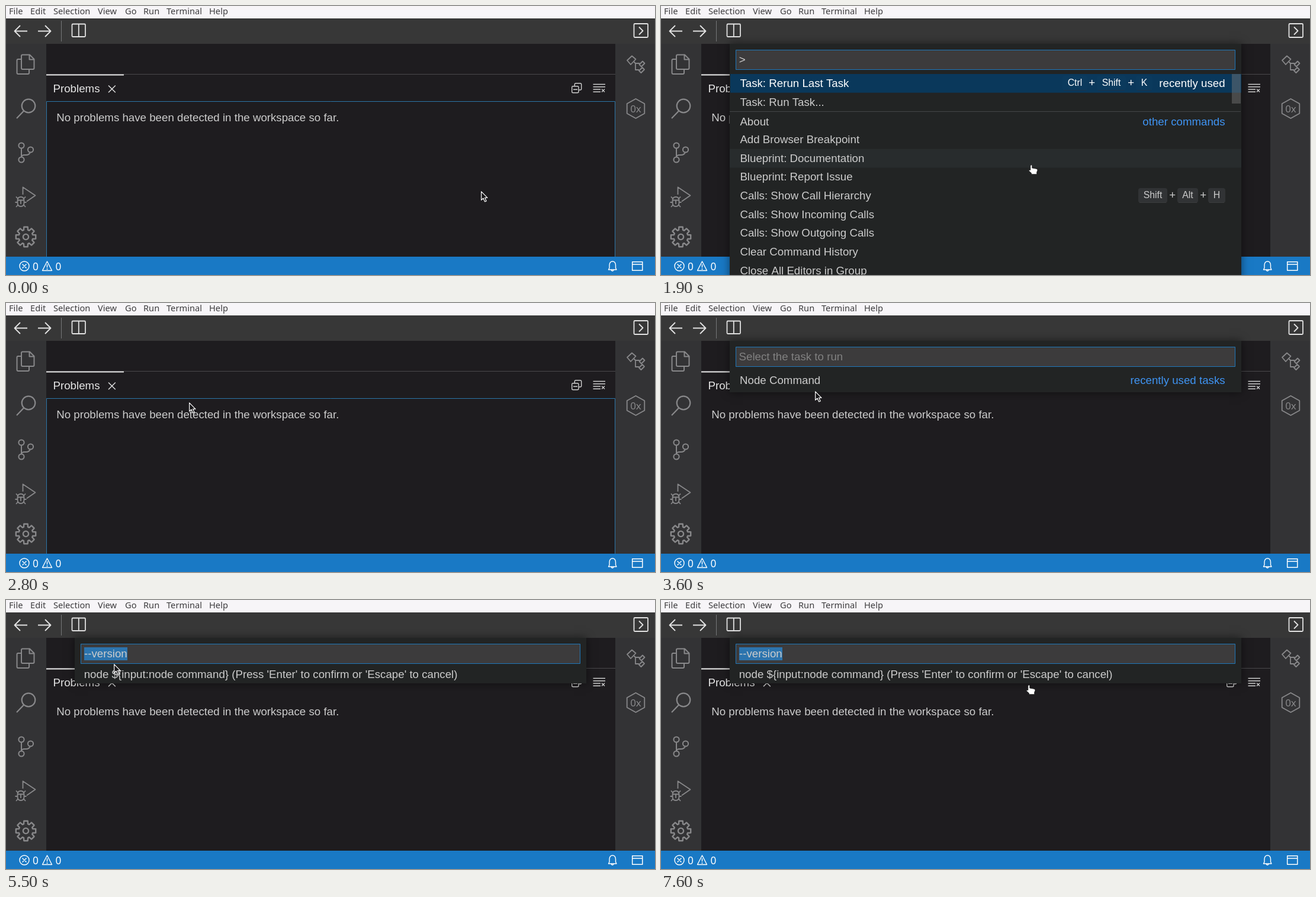
These frames come from a looping animation (1096x455 px, 8 s). An HTML page with a canvas:

```html
<!DOCTYPE html>
<html lang="en">
<head>
<meta charset="utf-8">
<title>Running a task</title>
<style>
  html, body { margin: 0; width: 100%; height: 100%; overflow: hidden; background: #1e1c1f; }
  canvas { display: block; }
</style>
</head>
<body>
<canvas id="stage" width="1096" height="455"></canvas>
<script>
const ctx = document.getElementById('stage').getContext('2d');
const LOOP = 8000, STEP = 100;
const UI = '18.72px "Liberation Sans", Arial, sans-serif';
const KEY = '15.84px "Liberation Sans", Arial, sans-serif';
const MENU = '14.67px "Noto Sans", sans-serif';
const STATUS = '500 17.28px "Noto Sans", sans-serif';
const HEX = '17px "Noto Sans", sans-serif';
const TEXT = '#cccccc', LINK = '#3f94f3', BLUE = '#1f78ba', PANEL = '#222424', HOVER = '#282c2d';
const ROW_TOP = 115, ROW_HEIGHT = 31.68;

const commands = [
  'Task: Rerun Last Task', 'Task: Run Task...', 'About', 'Add Browser Breakpoint',
  'Blueprint: Documentation', 'Blueprint: Report Issue', 'Calls: Show Call Hierarchy',
  'Calls: Show Incoming Calls', 'Calls: Show Outgoing Calls', 'Clear Command History',
  'Close All Editors in Group'
];

// Pointer hot spot: time, x, y
const pointerPath = [
  [0, 802, 313], [1800, 802, 313], [1900, 625, 269], [2400, 309, 168], [3400, 309, 168],
  [4000, 220, 133], [4700, 220, 133], [4800, 218, 124], [5400, 218, 124], [5500, 182, 108],
  [5700, 182, 108], [5800, 150, 92], [6100, 338, 95], [6500, 338, 95], [6900, 595, 119],
  [7300, 595, 119], [7600, 621, 144], [LOOP, 621, 144]
];

function rect(x, y, w, h, color) {
  ctx.fillStyle = color;
  ctx.fillRect(x, y, w, h);
}

function text(str, x, y, color = TEXT, font = UI, align = 'left') {
  ctx.font = font;
  ctx.textAlign = align;
  ctx.fillStyle = color;
  ctx.fillText(str, x, y);
}

function line(d, color, width, fill) {
  const path = new Path2D(d);
  if (fill) { ctx.fillStyle = fill; ctx.fill(path); }
  ctx.strokeStyle = color;
  ctx.lineWidth = width;
  ctx.stroke(path);
}

const circle = (x, y, r) => `M${x - r} ${y}a${r} ${r} 0 1 0 ${2 * r} 0a${r} ${r} 0 1 0 ${-2 * r} 0`;

function gear(cx, cy, r, color, width) {
  const points = [];
  for (let k = 0; k < 8; k++) {
    for (const [offset, scale] of [[-.3, .71], [-.19, 1], [.19, 1], [.3, .71]]) {
      const a = k * Math.PI / 4 + offset;
      points.push(`${cx + r * scale * Math.cos(a)} ${cy + r * scale * Math.sin(a)}`);
    }
  }
  line(`M${points.join('L')}Z${circle(cx, cy, r * .27)}`, color, width);
}

function drawFrame() {
  rect(0, 0, 1096, 455, '#1e1c1f');
  rect(0, 0, 1096, 21, '#f7f5f8');
  rect(0, 21, 1096, 43, '#373737');
  rect(0, 64, 68, 360, '#333335');
  rect(1029, 64, 67, 360, '#333335');
  rect(0, 424, 1096, 31, '#1979c5');

  const menu = { File: 5, Edit: 41, Selection: 80, View: 155, Go: 201, Run: 232, Terminal: 271, Help: 343 };
  for (const label in menu) text(label, menu[label], 14, '#3c3b3d', MENU);

  line('M36 42.5H14.5M24 33L14.5 42.5L24 52M54 42.5H75.5M66 33L75.5 42.5L66 52', '#e2e2e2', 1.8);
  line('M93.5 25V60', '#757779', 1);
  line('M113 30.5H132.5Q134 30.5 134 32V50.5Q134 52 132.5 52H113Q111.5 52 111.5 50.5V32Q111.5 30.5 113 30.5ZM122.8 31V52', '#e2e2e2', 1.8);
  line('M1062 30H1082.5Q1084 30 1084 31.5V51.5Q1084 53 1082.5 53H1062Q1060.5 53 1060.5 51.5V31.5Q1060.5 30 1062 30ZM1069 35.5L1075.5 42L1069 48.5', '#e2e2e2', 1.8);

  const icon = '#88888a';
  line('M28 82.5H40L47.5 90V105Q47.5 107 45.5 107H28Q26 107 26 105V84.5Q26 82.5 28 82.5ZM39.5 83V90.5H47M26 90H20.5Q18.5 90 18.5 92V113Q18.5 115 20.5 115H37Q39 115 39 113V107', icon, 2);
  line(circle(38, 169, 11.3) + 'M30 177.5L18 190', icon, 2.2);
  line(circle(26, 236, 4.6) + circle(26, 260, 4.6) + circle(41.5, 243, 4.6) + 'M26 240.5V255.5M41 247.5Q39 252 34 252H31Q27 252 26 255', icon, 2);
  line('M28.5 319V306.5L49.5 320.5L35 330.5M19.5 329Q19.5 323 25 323T30.5 329V333Q30.5 339 25 339T19.5 333ZM19.5 328.5H30.5M25 329V335M20 326L17 322.5M30 326L33 322.5M19.5 332H15.5M30.5 332H34.5M20.5 336L17 340M29.5 336L33 340', icon, 1.8);
  gear(33.5, 390.5, 17, icon, 2.4);
  line('M1049 92L1057 84.5L1063.5 90L1055 99ZM1060.5 94.5L1063 97H1070M1063 97V108H1069M1069.5 99L1075 93.5L1078.5 97L1073 102.5ZM1069 109.5L1074.5 104L1078 107.5L1072.5 113Z', icon, 1.8);
  line('M1063.5 157L1078.3 165.3V181.7L1063.5 190L1048.7 181.7V165.3Z', icon, 1.8);
  text('0x', 1063.5, 180, icon, HEX, 'center');

  line(circle(31, 440, 8) + 'M27.5 436.5L34.5 443.5M34.5 436.5L27.5 443.5M69.5 432L77.5 447.5H61.5ZM69.5 437V442.5M69.5 444V446', '#fff', 1.4);
  text('0', 45, 446.5, '#fff', STATUS);
  text('0', 83.5, 446.5, '#fff', STATUS);
  line('M1017.5 446H1031L1029.5 443V438Q1029 432 1024.3 432T1019 438V443ZM1022 446.5Q1024.3 450 1026.5 446.5', '#fff', 1.4);
  line('M1057.7 432.7H1074.8V447.3H1057.7ZM1057.7 437H1074.8', '#fff', 1.5);
}

function drawProblems(focused) {
  rect(68, 115, 961, 1, '#4a494c');
  rect(68, 115.5, 131, 2, '#e4e4e4');
  text('Problems', 79.5, 146, '#e6e6e6');
  line('M173 134.5L184.8 146.3M184.8 134.5L173 146.3', '#dedede', 1.5);
  line('M957 135.8H965Q967 135.8 967 137.8V144.7Q967 146.7 965 146.7H957.5Q955.7 146.7 955.7 144.7V137.8Q955.7 135.8 957 135.8ZM958 141.3H965M960.3 135V132.5Q960.3 130.7 962.3 130.7H969.7Q971.7 130.7 971.7 132.7V140Q971.7 142 969.7 142H967.5', '#cfcfcf', 1.4);
  line('M991.5 132.5H1012M991.5 136.7H1012M991.5 141H1004M991.5 145.3H1004M1006 140.5L1011 145.5M1011 140.5L1006 145.5', '#cfcfcf', 1.4);
  text('No problems have been detected in the workspace so far.', 85.2, 195);
  if (focused) line('M68.5 424V161.5H1028.5V424', '#2c76a8', 1);
}

function drawPanel(bottom, focused) {
  ctx.save();
  ctx.shadowColor = 'rgba(0,0,0,.5)';
  ctx.shadowBlur = 14;
  rect(116, 64, 864, bottom - 64, PANEL);
  ctx.restore();
  rect(126, 74, 844, 34, '#3c3b3c');
  if (focused) line('M126.5 74.5H969.5V107.5H126.5Z', BLUE, 1);
}

function drawCaret(x) {
  rect(x, 80, 1.3, 21, '#d8d8d8');
}

function drawKeys(keys, y, selected) {
  keys.forEach(([label, x, w], i) => {
    ctx.beginPath();
    ctx.roundRect(x, y - 19, w, 25, 4);
    ctx.fillStyle = selected ? '#0b3a5d' : '#313335';
    ctx.fill();
    rect(x + 2, y + 5, w - 4, 1, selected ? '#1d3348' : '#3c3d3e');
    text(label, x + w / 2, y - 2, selected ? '#fff' : TEXT, KEY, 'center');
    if (i) text('+', x - 8.3, y - 1, selected ? '#fff' : TEXT, UI, 'center');
  });
}

function drawPalette(t, pointer) {
  const selected = t >= 1100, focused = t < 2600;
  drawPanel(470, focused);
  text('>', 131.7, 97);
  if (t < 1400 || (t >= 2000 && t < 2400)) drawCaret(142);

  const hovered = Math.floor((pointer.y - ROW_TOP) / ROW_HEIGHT);
  rect(116, ROW_TOP + hovered * ROW_HEIGHT, 864, ROW_HEIGHT, HOVER);
  if (selected) rect(117, ROW_TOP, 863, ROW_HEIGHT, '#0a385b');
  rect(116, 178, 863, 1, '#444648');

  commands.forEach((label, i) => {
    const y = Math.round(137 + i * ROW_HEIGHT) + (i === 2 ? 2 : 0);
    text(label, 133.4, y, selected && i === 0 ? '#fff' : TEXT);
  });
  drawKeys([['Ctrl', 678, 42], ['Shift', 736, 49], ['K', 802, 28]], 137, selected);
  drawKeys([['Shift', 806, 49], ['Alt', 872, 35], ['H', 924, 29]], 327, false);
  text('recently used', 952.6, 137, selected ? '#fff' : LINK, UI, 'right');
  text('other commands', 952.6, 202, LINK, UI, 'right');
  if (selected) rect(964, ROW_TOP, 15, 50, 'rgba(121,121,121,.45)');
}

function drawTaskPicker(t, pointer) {
  const hovered = pointer.y < ROW_TOP + ROW_HEIGHT;
  drawPanel(151, t < 4600);
  text('Select the task to run', 131.5, 97, '#818181');
  if (t < 3500 || (t >= 4000 && t < 4600)) drawCaret(132);
  if (hovered) {
    rect(116, ROW_TOP, 864, ROW_HEIGHT, HOVER);
    gear(944, 130.7, 10, '#cfcfcf', 1.4);
  }
  text('Node Command', 133, 137);
  text('recently used tasks', hovered ? 917.8 : 952.6, 137, LINK, UI, 'right');
}

function drawInputBox() {
  drawPanel(141, true);
  rect(132, 80, 73, 22, '#2c74ae');
  text('--version', 132, 97);
  text("node ${input:node command} (Press 'Enter' to confirm or 'Escape' to cancel)", 131.7, 132);
}

function pointerAt(t) {
  const i = pointerPath.findIndex(([time]) => time > t);
  const [t0, x0, y0] = pointerPath[i - 1], [t1, x1, y1] = pointerPath[i];
  const p = (t - t0) / (t1 - t0), eased = p * (2 - p);
  return { x: x0 + (x1 - x0) * eased, y: y0 + (y1 - y0) * eased };
}

function pointerKind(t, y) {
  if (t < 800) return 'arrow';
  if (t < 2800) return 'hand';
  if (t < 2900) return 'arrow';
  if (t < 4800) return y < 147 ? 'hand' : 'arrow';
  if (t >= 5800 && y < 108) return 'beam';
  return y > 141 ? 'hand' : 'arrow';
}

function drawPointer({ x, y }, kind) {
  ctx.save();
  ctx.translate(Math.round(x), Math.round(y));
  if (kind === 'arrow') {
    line('M.7 .8V15.3L4 12.2L6.7 18L9.2 17L6.6 11.3H11Z', '#fff', 1.2, '#19181a');
  } else if (kind === 'hand') {
    line('M-1.2 .8Q.5 -1.2 1.8 .8V5L9 6.3Q11.2 6.8 11 9L9.7 12V15.7H.5V13.8L-3.8 9.7Q-4 7.4 -1.2 8.5Z', '#151515', .8, '#fff');
  } else {
    const beam = 'M-3 -7.5H3M0 -7.5V7.5M-3 7.5H3';
    line(beam, '#111', 3.6);
    line(beam, '#fff', 1.5);
  }
  ctx.restore();
}

function render(now) {
  const t = Math.floor((now % LOOP) / STEP) * STEP;
  const pointer = pointerAt(t);
  const idle = t < 800 || (t >= 2800 && t < 2900);
  ctx.lineJoin = 'round';
  drawFrame();
  drawProblems(idle);
  if (!idle) {
    if (t < 2800) drawPalette(t, pointer);
    else if (t < 4700) drawTaskPicker(t, pointer);
    else drawInputBox();
  }
  drawPointer(pointer, pointerKind(t, pointer.y));
}

const start = performance.now();
function tick() {
  render(performance.now() - start);
  requestAnimationFrame(tick);
}
tick();
</script>
</body>
</html>
```
